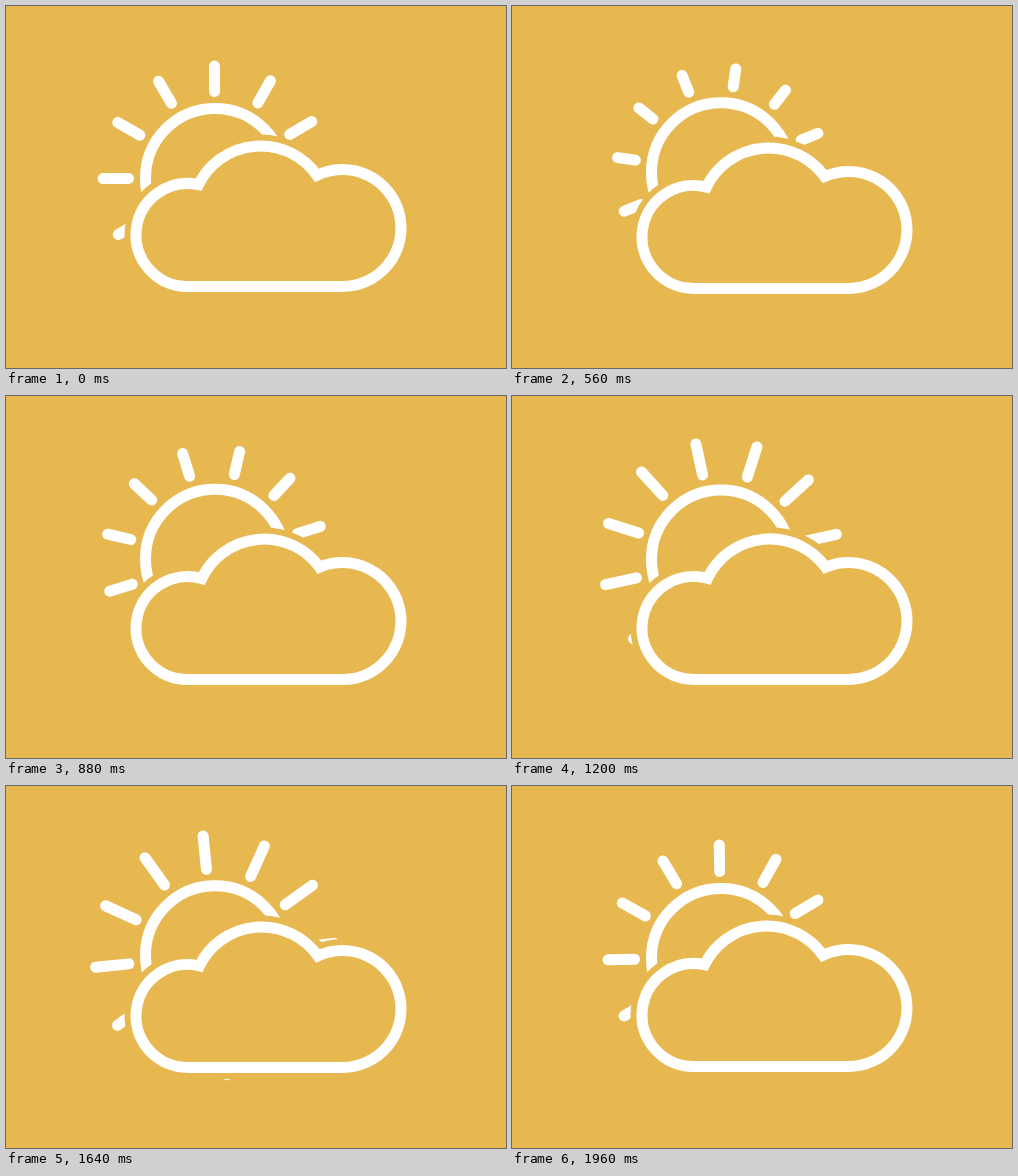
These frames come from a looping animation (500 px wide and 362 px high, 2000 ms). An HTML page:

```html
<!DOCTYPE html>
<html lang="en">
<head>
<meta charset="utf-8">
<title>Partly cloudy</title>
<style>
  html, body { margin: 0; width: 100%; height: 100%; overflow: hidden; background: #e8b850; }
  svg { display: block; width: 500px; height: 362px; }
  path, circle { fill: none; stroke: #fff; stroke-width: 11; }
  #rays { stroke-linecap: round; }
  #gap { fill: #e8b850; stroke: #e8b850; stroke-width: 23; }
</style>
</head>
<body>
<svg viewBox="0 0 500 362">
  <g id="sun">
    <circle r="69.5"/>
    <path id="rays"/>
  </g>
  <path id="gap"/>
  <path id="cloud"/>
</svg>
<script>
const LOOP = 2000, TAU = Math.PI * 2;
const [sun, rays, gap, cloud] = ['sun', 'rays', 'gap', 'cloud'].map(id => document.getElementById(id));

// Upper crossing point of two circles, a lying left of b
function meet(a, b) {
  const dx = b.x - a.x, dy = b.y - a.y, d = Math.hypot(dx, dy);
  const along = (d * d + a.r * a.r - b.r * b.r) / (2 * d);
  const up = Math.sqrt(a.r * a.r - along * along);
  return [a.x + (along * dx + up * dy) / d, a.y + (along * dy - up * dx) / d];
}

function cloudPath(swell) {
  const left = { x: 181.5, y: 229 + 3.2 * swell, r: 51.5 };
  const mid = { x: 254.5 + 3.7 * swell, y: 209 + 3.2 * swell, r: 69 };
  const right = { x: 336.5, y: 222 + 3.2 * swell, r: 58.5 };
  const base = left.y + left.r;
  const arc = (c, end, large = 0) => `A${c.r} ${c.r} 0 ${large} 1 ${end}`;
  return `M${left.x} ${base}` + arc(left, meet(left, mid), 1) + arc(mid, meet(mid, right)) +
    arc(right, [right.x, base], 1) + 'Z';
}

function rayPath(tip) {
  let d = '';
  for (let i = 0; i < 12; i++) {
    const x = Math.sin(i * TAU / 12), y = -Math.cos(i * TAU / 12);
    d += `M${86.5 * x} ${86.5 * y}L${tip * x} ${tip * y}`;
  }
  return d;
}

function draw(now) {
  const p = now % LOOP / LOOP;
  const swell = (1 - Math.cos(TAU * p)) / 2;
  sun.setAttribute('transform', `translate(209 ${172 - 9.5 * swell})`);
  rays.setAttribute('transform', `rotate(${30 * p - 0.3})`);
  rays.setAttribute('d', rayPath(112.6 - 8.5 * Math.sin(TAU * (p + 0.012))));
  const d = cloudPath(swell);
  gap.setAttribute('d', d);
  cloud.setAttribute('d', d);
  requestAnimationFrame(draw);
}
draw(0);
</script>
</body>
</html>
```
